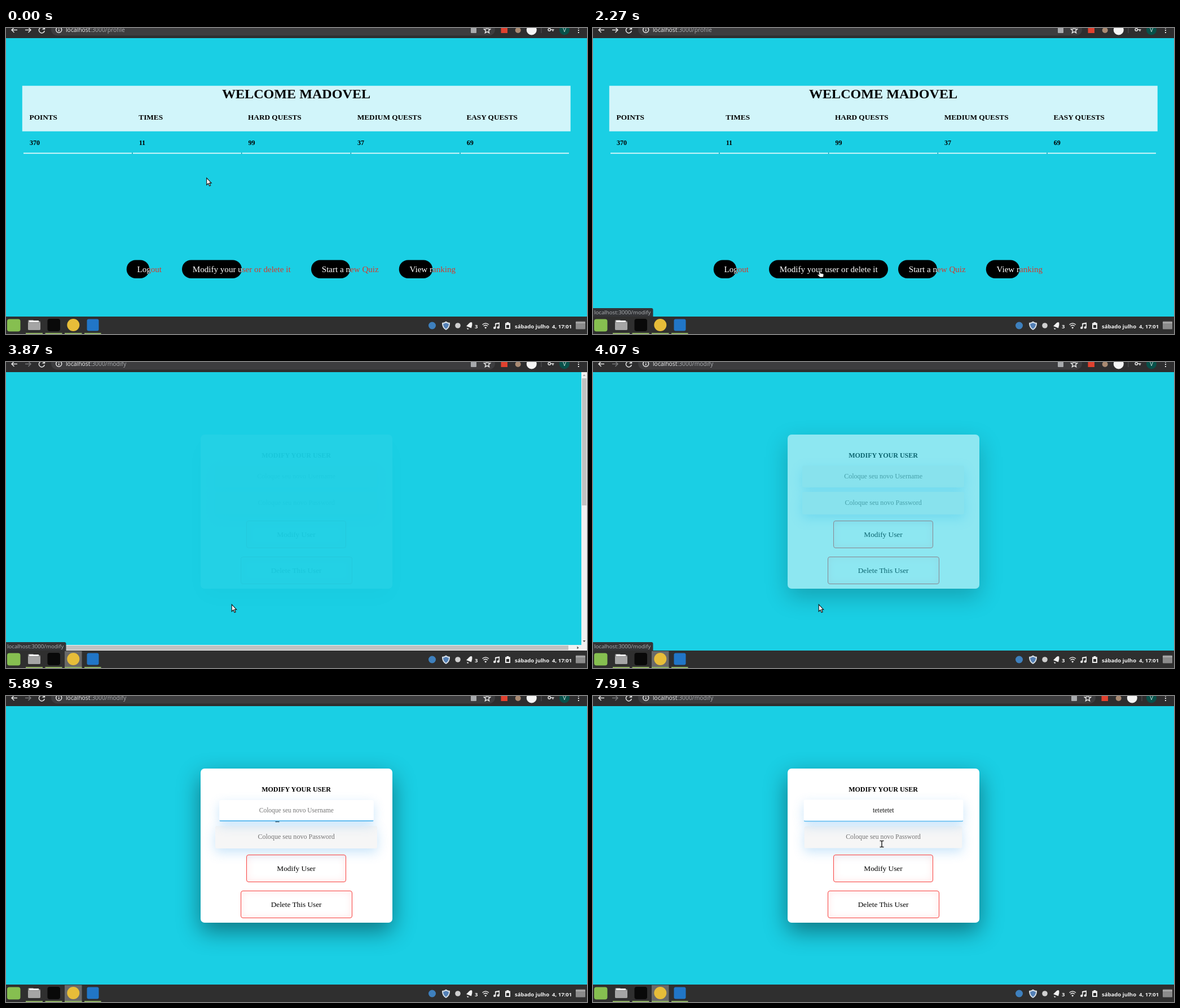
These frames come from a looping animation (1030x544 px, 8000 ms). An HTML page:

```html
<!DOCTYPE html>
<html lang="en">
<head>
<meta charset="utf-8">
<title>Profile quiz</title>
<style>
  html, body { margin: 0; width: 100%; height: 100%; overflow: hidden; background: #1acfe4; }
  svg { position: absolute; left: 0; top: 0; width: 1030px; height: 544px; }
  .serif, .card { font-family: "Liberation Serif", serif; }
  .sans { font-family: "Open Sans", "Noto Sans", sans-serif; }
  .bold { font-weight: bold; }
  .line { fill: none; stroke: #e4e4e4; stroke-width: 1.5; }
  .card, .card div { position: absolute; box-sizing: border-box; text-align: center; }
  .card {
    left: 344.6px; top: 129px; width: 340px; height: 274px; border-radius: 7px;
    background: #fff; box-shadow: 0 15px 40px rgba(0, 0, 0, .43); color: #000;
  }
  .card .title { left: 0; width: 100%; top: 27px; line-height: 20px; font-size: 12.06px; font-weight: bold; }
  .card .field {
    left: 26.2px; width: 287.6px; height: 39.5px; line-height: 39.5px; border-radius: 3px;
    font-size: 12.06px; color: #757575; background: #f6f6f6;
    box-shadow: 0 7px 20px rgba(75, 170, 240, .3);
  }
  .card .field.active { background: #fff; border-bottom: 2px solid #62bdf0; z-index: 1; }
  .card .button {
    height: 49px; line-height: 47px; font-size: 13.3px; border: 1px solid #f8423f; border-radius: 4px;
    box-shadow: inset 0 0 14px rgba(255, 60, 70, .13);
  }
</style>
</head>
<body>
<svg id="page" class="serif" viewBox="0 0 1030 544">
  <rect width="1030" height="544" fill="#1acfe4"/>
  <g id="profile">
    <rect x="28.8" y="102.7" width="972" height="81" fill="#d1f5fa"/>
    <text x="514.5" y="125" font-size="24.12" text-anchor="middle" class="bold">WELCOME MADOVEL</text>
    <g id="table" class="bold"></g>
    <g id="pills" font-size="15.08"></g>
  </g>
</svg>

<div class="card" id="card">
  <div class="title">MODIFY YOUR USER</div>
  <div class="field" id="username" style="top:54.7px"></div>
  <div class="field" id="password" style="top:102px">Coloque seu novo Password</div>
  <div class="button" style="left:81.4px;top:153px;width:177px">Modify User</div>
  <div class="button" style="left:71px;top:217px;width:198px">Delete This User</div>
</div>

<svg id="desktop" class="sans" viewBox="0 0 1030 544">
  <g id="scrollbars">
    <path d="M1020 18h10v495H0v-10h1020z" fill="#f1f1f1"/>
    <path d="M1021 29h8v226h-8zM10 504h987v8H10z" fill="#c1c1c1"/>
    <path d="M1022.500 25h5l-2.500-3z" fill="#a5a5a5"/>
    <path d="M1022.500 495h5l-2.500 3zM1012.500 505.500v5l3-2.500z" fill="#505050"/>
  </g>
  <g id="status">
    <path d="M0 498h103.500a3 3 0 0 1 3 3v12H0z" fill="#333437"/>
    <text x="2" y="509" font-size="9.7" fill="#aeb1b4">localhost:3000/modify</text>
  </g>

  <rect width="1030" height="18" fill="#2e2e2f"/>
  <rect id="omnibox" x="80" y="-8" height="21.500" rx="10.700" fill="#3d3d3f"/>
  <path class="line" d="M20 3.500H10M14.500-1L10 3.500l4.500 4.500"/>
  <path class="line" id="forward" d="M34 3.500h10M39.500-1l4.500 4.500l-4.500 4.500"/>
  <path class="line" d="M67.500 1a5 5 0 1 0 .800 4M68.500-2v4h-4"/>
  <circle class="line" cx="93.700" cy="3.200" r="5" stroke-width="1.200"/>
  <path class="line" d="M93.700 2.500v3.500M93.700 0v1.200"/>
  <text x="106" y="6.700" font-size="10.36" fill="#a9abae"><tspan fill="#eee">localhost</tspan><tspan id="route"></tspan></text>
  <g id="tools">
    <rect x="824" y="-1" width="10" height="10" rx="1" fill="#a8aaad"/>
    <path class="line" stroke-width="1.200" d="M853-2l1.600 3.700l4 .300l-3 2.700l.900 3.900l-3.500-2.100l-3.500 2.100l.900-3.900l-3-2.700l4-.300z"/>
    <rect x="877.500" y="-2" width="11.500" height="11" fill="#e0412f"/>
    <circle cx="907.700" cy="4" r="5" fill="#a98a72"/>
    <circle cx="931.800" cy="3.500" r="9" fill="#f5f5f5"/>
    <path d="M949-3V9" stroke="#56575a"/>
  </g>
  <g id="key">
    <circle class="line" cx="963.300" cy="3" r="2.200"/>
    <path class="line" d="M965.500 3h6M969.500 3v3"/>
  </g>
  <circle cx="990" cy="3.500" r="9" fill="#07514a"/>
  <text x="990" y="7" font-size="9.500" fill="#e3efec" text-anchor="middle">V</text>
  <path d="M1015-1v2M1015 3v2M1015 7v2" stroke="#e4e4e4" stroke-width="2"/>

  <rect y="513" width="1030" height="31" fill="#2f2f2f"/>
  <rect id="tile" x="104" y="514" width="30.500" height="30" fill="#696969"/>
  <path d="M35 543h30M69.500 543h30M104 543h30.500M139 543h29.500" stroke="#8fb263" stroke-width="2"/>
  <rect x="2" y="517.500" width="23.500" height="22" rx="4" fill="#86bf50"/>
  <path d="M39 521q0-2 2-2h7l2 2h9q2 0 2 2v12q0 2-2 2H41q-2 0-2-2z" fill="#8c8c8c"/>
  <path d="M41 520h17v3H41z" fill="#f1f1f1"/>
  <path d="M39 524h22v11q0 2-2 2H41q-2 0-2-2z" fill="#a5a5a5"/>
  <rect x="73.500" y="517" width="22.500" height="22" rx="4" fill="#090909"/>
  <circle cx="119.300" cy="528" r="11" fill="#e7bd39"/>
  <rect x="143.500" y="517.500" width="21" height="21" rx="3" fill="#2176c7"/>

  <circle cx="755.500" cy="529" r="6.500" fill="#3e80bd"/>
  <path d="M780 521.500q3.500 2.500 7 2.500q.500 9-7 13q-7.500-4-7-13q3.500 0 7-2.500z" fill="#dbe3ea"/>
  <path d="M780 524q2.500 1.500 5 1.700q0 6-5 9.300q-5-3.300-5-9.300q2.500-.200 5-1.700z" fill="#5480b5"/>
  <circle cx="801" cy="529" r="4.800" fill="#cfcfcf"/>
  <g fill="#efefef">
    <path d="M816 530l6-6q4-1 4.500 3.500l-1.500 6zM817 533l4 2l-3 1z"/>
    <circle cx="824.500" cy="525" r="2"/>
    <path d="M867 525l8-1.500v9a2.200 2 0 1 1-1.500-2v-4.500l-5 1v6a2.200 2 0 1 1-1.500-2z"/>
    <path d="M887.500 523h4v1.500h2.500v10.500h-9v-10.500h2.500z"/>
    <path d="M848.300 532.500a2.500 2.500 0 0 1 3.800 0l-1.900 2.300z"/>
  </g>
  <path d="M887 528h5v5h-5z" fill="#2f2f2f"/>
  <path class="line" d="M844.500 527.500q5.700-5 11.400 0M846.500 530q3.700-3.300 7.400 0"/>
  <text x="831" y="533.500" font-size="9.600" class="bold" fill="#f3f3f3">3</text>
  <text x="902" y="533.500" font-size="9.550" class="bold" fill="#f3f3f3" xml:space="preserve">sábado julho  4, 17:01</text>
  <rect x="1010" y="521.500" width="17" height="14" rx="1" fill="#8b8b8b"/>
  <path d="M1010 524h17" stroke="#b9b9b9" stroke-width="1.500"/>

  <g id="cursor">
    <path id="arrow" d="M.700.700v12.300l2.900-2.700l2 4.500l2-.900l-2-4.300h3.600z" fill="#fff" stroke="#111" stroke-width="1.100"/>
    <path id="hand" d="M3 .800q1.300-.800 2 .500l1 4l5 1.200q1.300.500 1 2l-1 4H5.500L1 8.500q0-1.500 1.800-1l1.200.800z" fill="#fff" stroke="#111" stroke-width=".8"/>
    <g id="beam" fill="none">
      <path d="M-3.500-5.500h2.500l1 1l1-1h2.500M0-4.500v9M-3.500 5.500h2.500l1-1l1 1h2.500" stroke="#fff" stroke-width="3.200"/>
      <path d="M-3.500-5.500h2.500l1 1l1-1h2.500M0-4.500v9M-3.500 5.500h2.500l1-1l1 1h2.500" stroke="#222" stroke-width="1.500"/>
    </g>
  </g>
</svg>

<script>
const $ = id => document.getElementById(id);
const LOOP = 8000;

const columns = [["POINTS", 370], ["TIMES", 11], ["HARD QUESTS", 99], ["MEDIUM QUESTS", 37], ["EASY QUESTS", 69]];
$("table").innerHTML = columns.map(([label, value], i) => {
  const x = 31 + i * 193.7;
  const tick = i ? `<path d="M${x - .8} 221.500v2.500" stroke="#188f9d"/>` : "";
  return `<text x="${x + 10.600}" y="163.300" font-size="13.27">${label}</text>
    <text x="${x + 11}" y="208" font-size="12.06">${value}</text>
    <path d="M${x} 222.700h192.200" stroke="#e6fafc" stroke-width="1.700"/>${tick}`;
}).join("");

const pills = [["Logout", 213.7, 40.5], ["Modify your user or delete it", 312, 106], ["Start a new Quiz", 541, 69], ["View ranking", 696.7, 59.5]];
$("pills").innerHTML = pills.map(([label, x, width], i) => {
  const shape = `class="pill${i}" x="${x}" y="412.500" width="${width}" height="32.500" rx="16.200"`;
  const text = `<text x="${x + 18.800}" y="433.500"`;
  return `<clipPath id="clip${i}"><rect ${shape}/></clipPath>
    ${text} fill="#d53a2d">${label}</text><rect ${shape}/>
    ${text} fill="#fff" clip-path="url(#clip${i})">${label}</text>`;
}).join("");
const modifyPill = document.querySelectorAll(".pill1");

// Latest entry [time, ...values] that has been reached.
const at = (t, keys) => keys.reduce((found, key) => t >= key[0] ? key : found);
const show = (id, on) => { $(id).style.display = on ? "" : "none"; };

const cursorKeys = [
  [0, "arrow", 355, 266], [1400, "hand", 365, 421], [2090, "hand", 381, 427], [2270, "hand", 397, 430.500],
  [3870, "arrow", 399.500, 430.500], [4470, "arrow", 286, 273], [4690, "beam", 430, 235],
  [4894, "beam", 481, 218], [7710, "beam", 512, 263]
];
const pillKeys = [[0, 106], [1400, 99], [1560, 182], [1730, 217], [2090, 211]];
const fadeKeys = [[0, 0], [3870, .04], [4070, .5], [4270, 1]];
const userScale = [[0, 1], [5098, .99], [5302, .965], [5506, .95], [7910, .982]];
const passScale = [[0, 1], [7910, .975]];
const typedKeys = [[0, 0], [6330, 1], [6540, 3], [6750, 5], [6950, 7], [7160, 9]];

function drawCursor(t) {
  let [, kind, x, y] = at(t, cursorKeys);
  if (t < 1400) {
    const move = Math.min(1, Math.max(0, Math.ceil((t - 469) / 21.200) / 9));
    x += 4 * move;
    y += 83 * move;
  }
  for (const id of ["arrow", "hand", "beam"]) show(id, id === kind);
  $("cursor").setAttribute("transform", `translate(${x} ${y})`);
}

function draw(t) {
  const modify = t >= 3870, typing = t >= 6330;
  show("profile", !modify);
  modifyPill.forEach(pill => pill.setAttribute("width", at(t, pillKeys)[1]));

  $("card").style.opacity = at(t, fadeKeys)[1];
  const typed = at(t, typedKeys)[1], user = $("username");
  user.textContent = typed ? "tetetetet".slice(0, typed) : "Coloque seu novo Username";
  user.style.color = typed ? "#111" : "";
  user.style.transform = `scale(${at(t, userScale)[1]})`;
  user.classList.toggle("active", t >= 5098);
  $("password").style.transform = `scale(${at(t, passScale)[1]})`;

  show("scrollbars", modify && t < 4070);
  show("status", t >= 1560 && t < 4270);
  show("tile", t >= 3620);
  show("key", !typing);
  $("tools").setAttribute("transform", `translate(${typing ? 24 : 0} 0)`);
  $("omnibox").setAttribute("width", typing ? 811 : 787);
  $("forward").style.stroke = modify ? "#77787a" : "";
  $("route").textContent = modify ? ":3000/modify" : ":3000/profile";
  drawCursor(t);
}

function tick() {
  draw(performance.now() % LOOP);
  requestAnimationFrame(tick);
}
tick();
</script>
</body>
</html>
```
